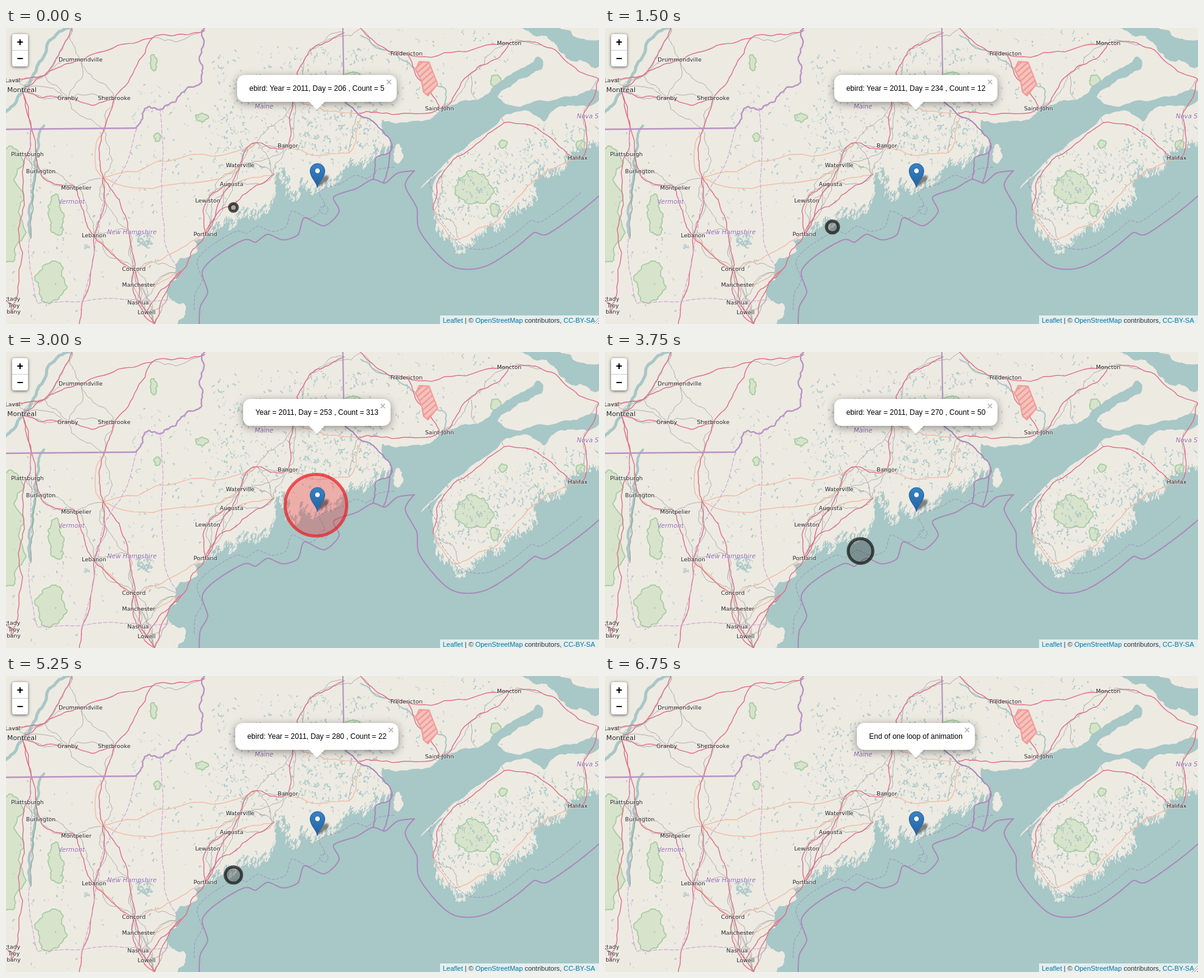
Recreate the animation shown at these times as an HTML page with a canvas. Size 970 by 485 pixels, loop 9 s.

```html
<!DOCTYPE html>
<html lang="en">
<head>
<meta charset="utf-8">
<title>Sightings map</title>
<style>
html, body { margin: 0; width: 970px; height: 485px; overflow: hidden; }
body { position: relative; font: 12px/18px "Liberation Sans", Arial, sans-serif; color: #000; }
canvas, svg { position: absolute; left: 0; top: 0; display: block; }
.label { font: 9.35px "DejaVu Sans", sans-serif; fill: #222; text-anchor: middle;
  paint-order: stroke; stroke: rgba(255,255,255,.5); stroke-width: 1.6px; stroke-linejoin: round; }
.city { font-size: 10.9px; }
.region { font-size: 10.2px; font-style: italic; fill: #8f68a8; }
.slide { position: absolute; inset: 0; visibility: hidden; animation: show 9s step-end infinite; }
.slide.last { animation-name: stay; }
@keyframes show { from { visibility: visible } 8.3333%, to { visibility: hidden } }
@keyframes stay { from { visibility: visible } 25%, to { visibility: hidden } }
.row { position: absolute; left: 0; top: 77px; width: 1017px; display: flex; justify-content: center; }
.popup { position: relative; height: 44px; padding: 0 20px; line-height: 44px; border-radius: 12px;
  background: #fff; white-space: nowrap; box-shadow: 0 3px 14px rgba(0,0,0,.4); }
.popup b { position: absolute; right: 8px; top: 3px; font-size: 16px; line-height: 18px; color: #b9b9b9; }
.tip { position: absolute; left: 495px; top: 120px; width: 27px; height: 14px; background: #fff;
  clip-path: polygon(0 0, 100% 0, 50% 100%); }
.grip { position: absolute; right: 0; bottom: 0; width: 11px; height: 11px; clip-path: polygon(100% 0, 100% 100%, 0 100%);
  background: repeating-linear-gradient(135deg, #f4f4f4 0 2px, #999 2px 3px); }
.zoom { position: absolute; left: 10px; top: 10px; width: 26px; height: 53px; border-radius: 4px;
  background: #fff; box-shadow: 0 1px 5px rgba(0,0,0,.65); font-weight: bold; font-size: 18px; text-align: center; }
.zoom i { display: block; height: 26px; line-height: 27px; font-style: normal; }
.zoom i + i { border-top: 1px solid #ccc; }
.credit { position: absolute; left: 710px; right: 0; top: 471px; height: 14px; padding-left: 4.5px;
  font-size: 11px; line-height: 16px; white-space: nowrap; color: #333; background: rgba(255,255,255,.7); }
.credit u { color: #0078a8; text-decoration: none; }
</style>
</head>
<body>
<canvas id="map" width="970" height="485"></canvas>
<svg id="labels" width="970" height="485"></svg>
<div id="rings"></div>
<svg width="970" height="485">
  <defs>
    <linearGradient id="blue" x2="0" y2="1"><stop stop-color="#3883c7"/><stop offset="1" stop-color="#2261a0"/></linearGradient>
    <filter id="blur" x="-50%" y="-50%" width="200%" height="200%"><feGaussianBlur stdDeviation="1.8"/></filter>
  </defs>
  <path d="M510 261L514 248Q520 240 527 242Q530 246 523 252Z" opacity=".45" filter="url(#blur)"/>
  <path d="M509.5 261.5C507.5 252 497.5 245 497.5 234A12 12 0 0 1 521.5 234C521.5 245 511.5 252 509.5 261.5Z" fill="url(#blue)" stroke="#27609a"/>
  <circle cx="509.5" cy="234" r="4.4" fill="#fff" stroke="#27609a"/>
</svg>
<div class="zoom"><i>+</i><i>−</i></div>
<div class="credit"><u>Leaflet</u> | © <u>OpenStreetMap</u> contributors, <u>CC-BY-SA</u></div>
<div id="popups"></div>
<script>
const ctx = document.getElementById('map').getContext('2d');
const LAND = '#edeae2', SEA = '#a8c7c7', RED = '#dd6f86', ORANGE = '#f1b9a0', RAIL = '#a9a7a2', PURPLE = '#aa86ba';
let seed = 4711;
const rnd = () => (seed = seed * 16807 % 2147483647) / 2147483647;
const spread = () => rnd() * 2 - 1;

// labelled towns, then unlabelled junctions
const towns = {
  Drummondville: [122, 52], Laval: [11, 86], Granby: [101, 115], Sherbrooke: [177, 115], Plattsburgh: [35, 207],
  Burlington: [57, 235], Montpelier: [115, 262], Lebanon: [144, 340], Concord: [209, 395], Manchester: [217, 421],
  Nashua: [216, 450], Lowell: [230, 466], Schenectady: [-7, 444], Troy: [13, 455], Albany: [8, 465], Portland: [326, 338],
  Lewiston: [330, 283], Augusta: [369, 256], Waterville: [383, 225], Bangor: [461, 193], Fredericton: [655, 42],
  'Saint John': [709, 132], Moncton: [823, 25], Halifax: [935, 213]
};
const regions = { Maine: [422, 129], Vermont: [107, 285], 'New Hampshire': [206, 335], 'Nova Scotia': [964, 145] };
const places = {
  ...towns, Montréal: [26, 102], Joliette: [62, 78], Bécancour: [108, 0], Québec: [240, 16], Beauce: [325, 4],
  Keene: [20, 330], Newport: [160, 168], Barnet: [159, 245], Springfield: [120, 485], Plymouth: [200, 332],
  Boston: [243, 485], Portsmouth: [288, 398], Brunswick: [354, 296], Belfast: [438, 240], Pittsfield: [410, 188],
  Lincoln: [469, 120], Houlton: [499, 35], Presque: [553, 8], Machias: [562, 204], Calais: [579, 140], Perth: [580, 0],
  Sussex: [758, 76], Amherst: [880, 30], Truro: [945, 140], Pictou: [970, 84], Digby: [713, 241], Yarmouth: [699, 298],
  Kentville: [815, 155], Shelburne: [742, 346], Bridgewater: [848, 266]
};

// four-point subdivision: a smooth curve, roughened by k
function trace(points, k = 0, depth = 4) {
  let p = points;
  if (typeof p === 'string') p = p.match(/\d+ \d+/g).map(s => s.split(' ').map(Number));
  while (depth--) {
    p = p.flatMap((b, i) => {
      const c = p[i + 1];
      if (!c) return [b];
      const a = p[i - 1] || b, d = p[i + 2] || c, r = k * spread();
      const mid = j => (9 * (b[j] + c[j]) - a[j] - d[j]) / 16;
      return [b, [mid(0) - r * (c[1] - b[1]), mid(1) + r * (c[0] - b[0])]];
    });
  }
  return p;
}
function path(p) {
  ctx.beginPath();
  p.forEach(q => ctx.lineTo(...q));
}
function stroke(p, color, w, dash = []) {
  path(p);
  ctx.strokeStyle = color; ctx.lineWidth = w;
  ctx.setLineDash(dash);
  ctx.stroke();
}
function fill(p, color) {
  path(p);
  ctx.fillStyle = color;
  ctx.fill();
}
function blob(x, y, w, h) {
  const p = [];
  for (let a = 0; a < 10; a++) {
    const r = .42 + rnd() * .14, t = a * Math.PI / 5;
    p.push([x + w * r * Math.cos(t), y + h * r * Math.sin(t)]);
  }
  return trace([...p, p[0]], .25, 3);
}
function lakes(n, x, y, w, h, size) {
  while (n--) {
    const s = size * (.2 + rnd() * rnd());
    const at = [x + rnd() * w, y + rnd() * h], to = [at[0] + s * spread(), at[1] + s * (.3 + rnd())];
    stroke(trace([at, to], .5, 2), SEA, .5 + rnd() * 1.2);
  }
}
// narrow inlets and points along a shore
function fringe(shore, n, lean, reach) {
  while (n--) {
    const [x, y] = shore[rnd() * shore.length | 0], inlet = rnd() < .5;
    const s = reach * (.2 + rnd()) * (inlet ? -1 : 1);
    stroke(trace([[x, y], [x + lean * s + spread(), y + s]], .3, 2), inlet ? SEA : LAND, .8 + rnd() * 1.2);
  }
}
const roads = (color, w, chains) => chains.forEach(chain =>
  stroke(trace(chain.split(', ').map(name => places[name]), .09), color, w));

ctx.lineCap = ctx.lineJoin = 'round';
fill([[0, 0], [970, 0], [970, 485], [0, 485]], LAND);

// parks: centre and size
[
  [6, 282, 54, 200], [82, 305, 24, 68], [74, 416, 44, 72], [241, 57, 11, 27], [248, 179, 10, 14], [321, 146, 22, 12],
  [568, 76, 24, 7], [801, 87, 18, 20], [764, 262, 62, 58], [800, 298, 14, 22], [813, 190, 14, 13], [940, 192, 16, 15]
].forEach(size => {
  const p = blob(...size);
  fill(p, 'rgba(185,218,172,.42)');
  stroke(p, '#a3cd9f', 1.7);
});

// inland water
lakes(420, 340, 30, 270, 200, 8);
lakes(160, 480, 75, 125, 125, 9);
lakes(150, 200, 90, 220, 230, 6);
lakes(90, 0, 170, 260, 315, 6);
lakes(100, 560, 0, 270, 140, 6);
lakes(330, 706, 190, 170, 130, 7);
lakes(100, 850, 155, 120, 85, 8);
lakes(60, 214, 335, 26, 22, 9);
stroke(trace('0 137 38 92 62 46 104 0', .12), SEA, 5);
stroke(trace('62 160 46 220 43 270 40 340', .12), SEA, 4);
stroke(trace('50 200 44 270 40 345', .1), '#8fb09a', 1.5);
stroke(trace('580 12 655 55 719 100 711 132', .12), SEA, 2);

// each town is joined by rail to its neighbours
const stops = Object.values(places);
stops.forEach((a, i) => stops.slice(i + 1).forEach(b => {
  const d = Math.hypot(a[0] - b[0], a[1] - b[1]);
  if (d > 35 && d < 98) stroke(trace([a, b], .16), RAIL, .9);
}));

// sea
const maine = trace('276 485 293 464 271 447 279 412 303 372 328 341 345 326 371 322 392 303 415 304 432 290 440 262 ' +
  '452 238 460 252 472 276 482 254 510 262 535 252 557 232 589 222 622 199 632 190 617 153', .28);
const fundy = trace('617 153 672 152 718 129 752 118 816 82 846 65 871 47 876 68 818 99 808 116 888 120 970 104 ' +
  '970 119 907 128 881 153 857 137 808 151', .12);
const neck = trace('808 151 750 198 700 241 679 263 716 231 698 261 700 304', .06);
const south = trace('700 304 716 340 736 361 750 362 780 337 835 300 862 258 875 233 890 240 915 218 970 195', .25);
fill([...maine, ...fundy, ...neck, ...south, [970, 485]], SEA);
fill(trace('842 0 862 12 890 20 905 38 940 52 970 62 970 20 930 14 905 0', .15), SEA);
fringe(maine.slice(80), 420, -.4, 8);
fringe(south, 260, .1, 7);
fill(blob(641, 207, 17, 30), LAND);

roads(ORANGE, 1.3, [
  'Barnet, Pittsfield', 'Newport, Barnet, Waterville', 'Bangor, Machias, Calais', 'Lincoln, Calais', 'Portland, Concord, Lebanon',
  'Manchester, Portsmouth', 'Belfast, Augusta', 'Yarmouth, Shelburne, Bridgewater, Halifax'
]);
roads(RED, 1.4, [
  'Montréal, Granby, Sherbrooke, Québec, Beauce', 'Montréal, Joliette, Drummondville, Québec', 'Laval, Joliette, Bécancour',
  'Montréal, Plattsburgh, Keene, Albany', 'Montréal, Burlington, Montpelier, Lebanon, Concord, Manchester, Lowell, Boston',
  'Sherbrooke, Newport, Barnet, Lebanon, Springfield', 'Barnet, Plymouth, Concord, Nashua, Boston',
  'Boston, Portsmouth, Portland, Augusta, Waterville, Pittsfield, Bangor, Lincoln, Houlton, Presque',
  'Portland, Lewiston, Augusta', 'Portland, Brunswick, Belfast', 'Lowell, Portsmouth', 'Schenectady, Troy, Albany',
  'Perth, Fredericton, Moncton, Amherst, Pictou', 'Calais, Saint John, Sussex, Moncton', 'Fredericton, Saint John',
  'Yarmouth, Digby, Kentville, Halifax, Truro, Pictou'
]);

// borders
stroke(trace('325 0 322 66 290 105 258 131 225 137 213 164', .2), '#b993c5', 2.4);
stroke([[213, 164], [0, 166]], '#b993c5', 2.4);
stroke([[551, 0], [553, 118]], '#b993c5', 2.2);
stroke(trace('553 118 595 149 631 190 604 216 600 248', .12), PURPLE, 2);
stroke(trace('631 190 626 225 617 254', .03), PURPLE, 1.9);
['214 165 190 235 158 290 125 451', '252 131 259 345 294 406', '52 451 268 445', '40 166 38 345 52 451']
  .forEach(s => stroke(trace(s, .04), '#cda9d2', 1.2, [6, 3]));

// sea limits, each with a dashed inner line shrunk towards the shore
const west = trace('316 485 318 456 330 432 321 400 345 373 390 347 408 351 428 338 452 347 478 338 488 311 520 324 545 300 ' +
  '536 277 573 263 600 248 620 254 640 238 668 234');
const east = trace('668 234 653 258 672 295 676 331 715 380 748 395 790 388 840 355 865 335 885 338 940 300 970 275');
const shrink = (p, cx, cy, s) => p.map(([x, y]) => [cx + (x - cx) * s, cy + (y - cy) * s]);
[west, east].forEach(p => stroke(p, PURPLE, 1.9));
[shrink(west, 200, 150, .93), shrink(east, 840, 240, .79), blob(520, 298, 14, 14)]
  .forEach(p => stroke(p, '#9c8fbb', 1, [4, 3]));

// restricted area
const zone = trace('670 68 676 55 692 56 706 92 690 111 683 105 680 88 670 68', 0, 0);
fill(zone, '#f4c3bd');
ctx.save();
path(zone);
ctx.clip();
for (let y = 50; y < 150; y += 10) stroke([[665, y], [710, y - 40]], '#f29a97', 2.5);
ctx.restore();
stroke(zone, '#f29a97', 2);

const add = (id, html) => document.getElementById(id).insertAdjacentHTML('beforeend', html);
const label = (set, kind) => Object.entries(set).forEach(([name, [x, y]]) =>
  add('labels', `<text class="label ${kind}" x="${x}" y="${y + 3.4}">${name}</text>`));
label(towns, '');
label({ Montréal: places.Montréal }, 'city');
label(regions, 'region');

const delay = i => `animation-delay:${i * 750 - 9000}ms`;
function popup(i, text, cls = '') {
  const grip = [0, 3, 9].includes(i) ? '<div class="grip"></div>' : '';
  add('popups', `<div class="slide ${cls}" style="${delay(i)}">
    <div class="row"><div class="popup">${text}<b>×</b></div></div><div class="tip"></div>${grip}</div>`);
}
// day, count and ring centre
[
  [206, 5, 372, 294], [230, 26, 327, 326], [234, 12, 372, 326], [238, 8, 395, 199], [253, 313, 507, 251],
  [270, 50, 418, 326], [275, 30, 372, 326], [280, 22, 372, 326], [290, 10, 372, 294]
].forEach(([day, count, x, y], i) => {
  const own = count > 300, color = own ? '#eb1e24' : '#141414';
  add('rings', `<svg class="slide" width="970" height="485" style="${delay(i)}">
    <circle cx="${x}" cy="${y}" r="${2.85 * Math.sqrt(count)}" fill="${color}" fill-opacity=".3"
      stroke="${color}" stroke-opacity=".72" stroke-width="5"/></svg>`);
  popup(i, `${own ? '' : 'ebird: '}Year = 2011, Day = ${day} , Count = ${count}`);
});
popup(9, 'End of one loop of animation', 'last');
</script>
</body>
</html>
```
